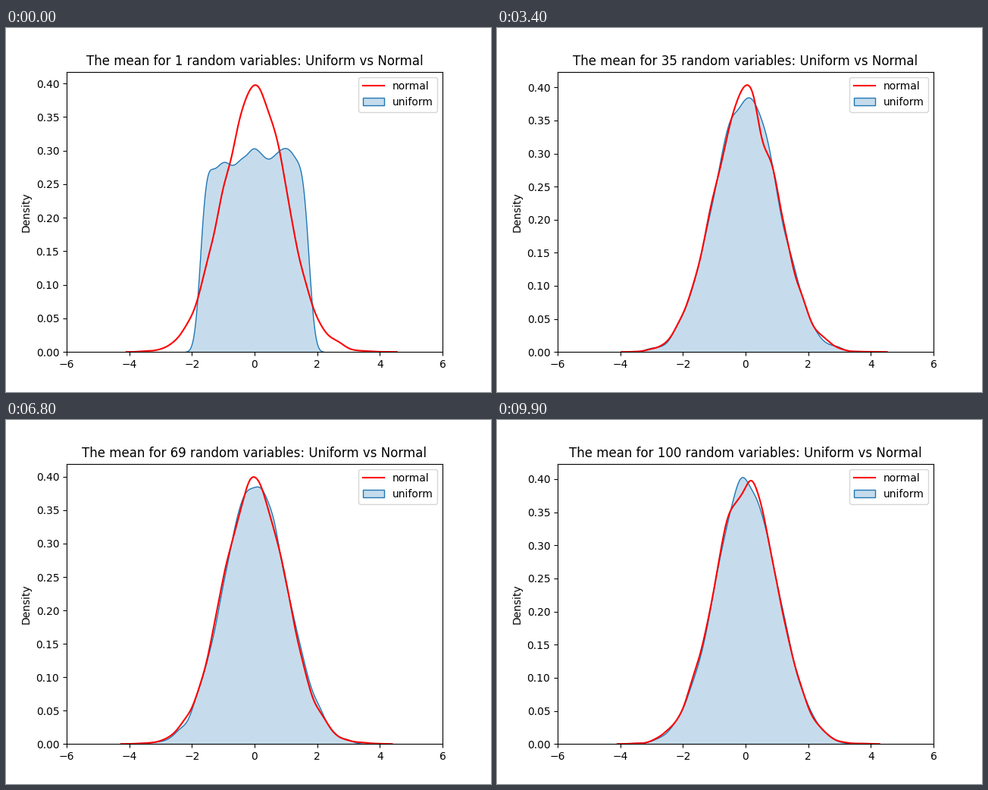
Recreate the animation shown at these times as a matplotlib script. Size 640 by 480 pixels, loop 10 s.

```python
import numpy as np
import matplotlib.pyplot as plt
from matplotlib.animation import FuncAnimation

N_SAMPLES = 10000
GRID = 200
FRAMES = 100
SEED = 7


def kde(samples):
    """Gaussian density estimate with Scott's bandwidth."""
    h = samples.std() * len(samples) ** -0.2
    x = np.linspace(samples.min() - 3 * h, samples.max() + 3 * h, GRID)
    counts, edges = np.histogram(samples, 1000)
    mids = (edges[:-1] + edges[1:]) / 2
    kernel = np.exp(-0.5 * ((x[:, None] - mids) / h) ** 2)
    return x, kernel @ counts / (len(samples) * h * np.sqrt(2 * np.pi))


def draw_samples(n):
    """Standard normal draws and standardised means of n uniforms."""
    rng = np.random.default_rng([SEED, n])
    normal = rng.standard_normal(N_SAMPLES)
    means = rng.random((N_SAMPLES, n)).mean(axis=1)
    return normal, (means - 0.5) * np.sqrt(12 * n)


fig, ax = plt.subplots(figsize=(6.4, 4.8), dpi=100)
line, = ax.plot([], [], color="red", label="normal")
area = ax.fill_between([0, 1], [0, 0], facecolor=("C0", 0.25), edgecolor="C0",
                       linewidth=1, label="uniform")
title = ax.set_title("")
ax.set_xlim(-6, 6)
ax.set_ylabel("Density")
ax.legend(loc="upper right")


def update(i):
    n = i + 1
    normal, uniform = map(kde, draw_samples(n))
    line.set_data(*normal)
    x, y = uniform
    outline = np.column_stack([x, y])
    area.set_verts([np.vstack([(x[0], 0), outline, (x[-1], 0)])])
    ax.set_ylim(0, 1.05 * max(normal[1].max(), y.max()))
    title.set_text(f"The mean for {n} random variables: Uniform vs Normal")
    return line, area, title


anim = FuncAnimation(fig, update, frames=FRAMES, interval=100, repeat=True,
                     repeat_delay=0, blit=False)
plt.show()
```
